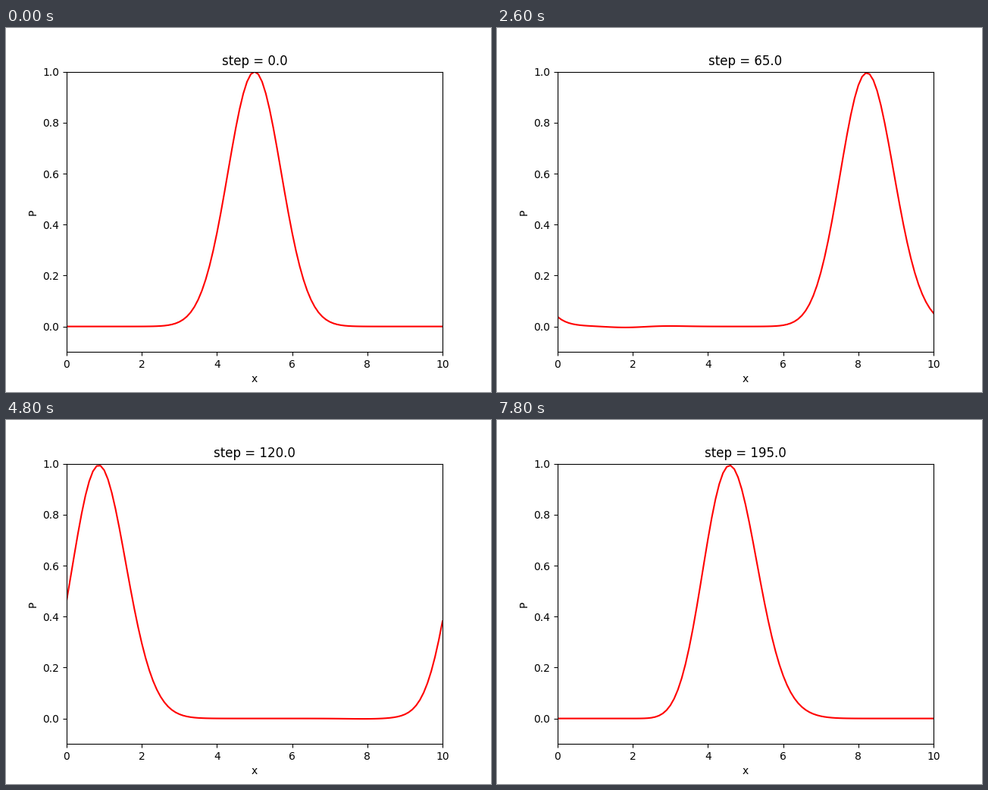
Recreate the animation shown at these times as a matplotlib script. Size 640x480 px, loop 8 s.

```python
import numpy as np
import matplotlib.pyplot as plt
from matplotlib.animation import FuncAnimation

# Advection of a Gaussian on a periodic grid: Lax first step, then leapfrog
DX = 0.1
COURANT = 0.5
STRIDE = 5
FRAMES = 40

x = np.arange(101) * DX


def neighbours(u):
    return np.roll(u, -1), np.roll(u, 1)


def lax(u):
    right, left = neighbours(u)
    return 0.5 * (right + left) - 0.5 * COURANT * (right - left)


def leapfrog(prev, u):
    right, left = neighbours(u)
    return prev - COURANT * (right - left)


def solve(steps):
    start = np.exp(-(x - 5) ** 2)
    history = [start, lax(start)]
    while len(history) < steps:
        history.append(leapfrog(history[-2], history[-1]))
    return history


history = solve(STRIDE * FRAMES)

plt.rcParams["font.family"] = "DejaVu Sans"
fig, ax = plt.subplots(figsize=(6.4, 4.8), dpi=100)
line, = ax.plot(x, history[0], color="red", lw=1.5)
ax.set_xlim(0, 10)
ax.set_ylim(-0.1, 1.0)
ax.set_xlabel("x")
ax.set_ylabel("P")
title = ax.set_title("step = 0.0")


def update(frame):
    step = frame * STRIDE
    line.set_ydata(history[step])
    title.set_text(f"step = {step:.1f}")
    return line, title


anim = FuncAnimation(fig, update, frames=FRAMES, interval=200,
                     repeat=True, repeat_delay=0, blit=False)
plt.show()
```
